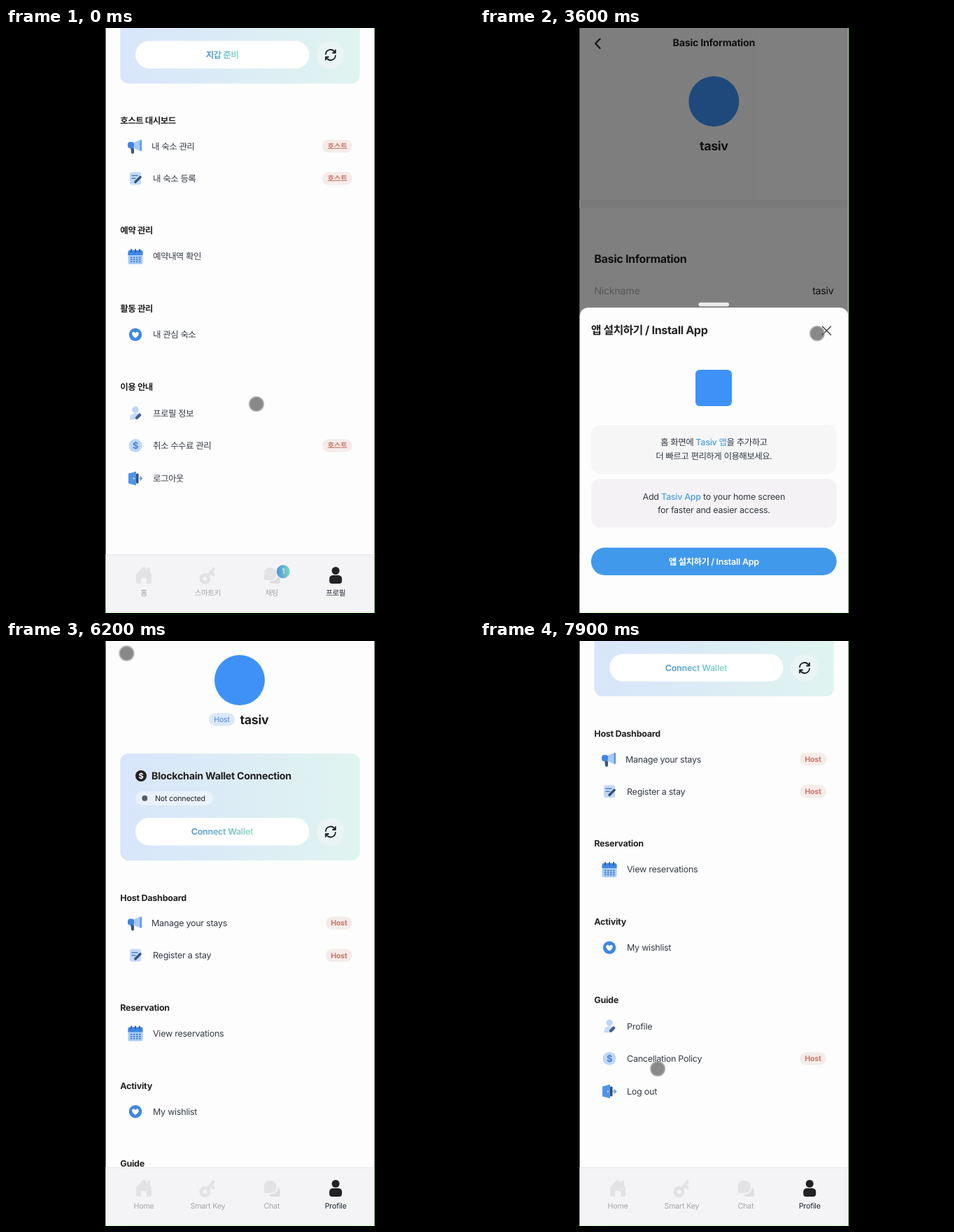
Animation, 669 px wide and 837 px high, one loop 8000 ms. Source, as an HTML page:

```html
<!DOCTYPE html>
<html lang="ko">
<head>
<meta charset="utf-8">
<title>Profile language switch</title>
<style>
html, body { margin: 0; width: 100%; height: 100%; overflow: hidden; background: #000; }
svg { display: block; }
text {
  font-family: Inter, "Noto Sans CJK KR", "Noto Sans CJK", sans-serif;
  letter-spacing: -.02em; fill: #222; white-space: pre; text-rendering: geometricPrecision;
}
.k { letter-spacing: -.045em; }
.b { font-weight: 700; }
.sb { font-weight: 600; }
.mid { text-anchor: middle; }
.end { text-anchor: end; }
.row { fill: #343a44; }
.soft { fill: #b0b0b4; }
.nav { fill: #a6a6a9; }
.on { fill: #1c2633; }
.red { fill: #c67a6c; }
.blue { fill: #4b83d6; }
.sky { fill: #4a9fe6; font-weight: 500; }
.white { fill: #fff; }
.grad { fill: url(#ink); }

.anim { animation: 8s step-end infinite; }
.ko-profile { animation-name: ko-profile; }
.ko-info { animation-name: ko-info; }
.lang { animation-name: lang; }
.en-info { animation-name: en-info; }
.en-profile { animation-name: en-profile; }
.badge { animation-name: badge; }
.touch { animation-name: touch; }
.arrow { animation-name: arrow; }
.scroll { animation: scroll 8s infinite ease-in-out; }
.dim { animation: dim 8s infinite linear; }
.sheet { animation: sheet 8s infinite ease-out; }
.cursor { animation: cursor 8s infinite ease-in-out; }

@keyframes ko-profile { 0% { visibility: visible } 7.5%, 100% { visibility: hidden } }
@keyframes ko-info { 0% { visibility: hidden } 7.5% { visibility: visible } 20%, 100% { visibility: hidden } }
@keyframes lang {
  0% { visibility: hidden } 20% { visibility: visible } 29.5% { visibility: hidden }
  61.25% { visibility: visible } 68.75%, 100% { visibility: hidden }
}
@keyframes en-info {
  0% { visibility: hidden } 29.5% { visibility: visible } 61.25% { visibility: hidden }
  68.75% { visibility: visible } 76.25%, 100% { visibility: hidden }
}
@keyframes en-profile { 0% { visibility: hidden } 76.25%, 100% { visibility: visible } }
@keyframes badge { 0% { opacity: 1 } 61.25%, 100% { opacity: 0 } }
@keyframes touch { 0% { opacity: 1 } 29.5% { opacity: 0 } 39%, 100% { opacity: 1 } }
@keyframes arrow { 0% { opacity: 0 } 29.5% { opacity: 1 } 39%, 100% { opacity: 0 } }
@keyframes scroll {
  0%, 86.5% { transform: translateY(0) }
  94%, 100% { transform: translateY(-234.5px) }
}
@keyframes dim { 0%, 37.5% { opacity: 0 } 41%, 47% { opacity: .5 } 50.5%, 100% { opacity: 0 } }
@keyframes sheet {
  0%, 37.5% { transform: translateY(450px) }
  41.5%, 47% { transform: none }
  51%, 100% { transform: translateY(450px) }
}
@keyframes cursor {
  0%, 1.25% { transform: translate(358px, 538px) }
  5%, 8% { transform: translate(246px, 552px) }
  16.25%, 19.5% { transform: translate(497px, 497px) }
  25%, 28% { transform: translate(365px, 404px) }
  29.5%, 39% { transform: translate(365px, 400px) }
  45% { transform: translate(482px, 437px) }
  46.5%, 49% { transform: translate(494px, 433px) }
  59%, 62.5% { transform: translate(169px, 23px) }
  66.25%, 77% { transform: translate(171px, 14px) }
  83.75%, 85% { transform: translate(297px, 340px) }
  98%, 100% { transform: translate(254px, 612px) }
}
</style>
</head>
<body>
<svg id="stage" width="669" height="837">
  <defs>
    <linearGradient id="ink"><stop stop-color="#4a90dc"/><stop offset="1" stop-color="#90dfc0"/></linearGradient>
    <linearGradient id="card"><stop stop-color="#d8e5fb"/><stop offset="1" stop-color="#e0f4ef"/></linearGradient>
    <linearGradient id="dot"><stop stop-color="#4b92df"/><stop offset="1" stop-color="#7fd8bc"/></linearGradient>
  </defs>
</svg>
<script>
const XS = 10.7, S = 12.5, M = 14.28, L = 16.07, XL = 17.86, XXL = 21.4;
const LOGO = '#3e92f7';
const NICK = 'tasiv', APP = 'Tasiv', MAIL = 'dorim2937@email.test';

const text = (x, y, size, s, cls = '') =>
  `<text x="${x}" y="${y}" font-size="${size}" class="${cls}">${s.replace(/[가-힣]+/g, '<tspan class="k">$&</tspan>')}</text>`;
const rect = (x, y, w, h, fill, r = 0) =>
  `<rect x="${x}" y="${y}" width="${w}" height="${h}" rx="${r}" fill="${fill}"/>`;
const circle = (x, y, r, fill) => `<circle cx="${x}" cy="${y}" r="${r}" fill="${fill}"/>`;
const path = (d, fill) => `<path d="${d}" fill="${fill}"/>`;
const line = (d, color, w) =>
  `<path d="${d}" fill="none" stroke="${color}" stroke-width="${w}" stroke-linecap="round" stroke-linejoin="round"/>`;
const at = (x, y, body) => `<g transform="translate(${x} ${y})">${body}</g>`;
const group = (cls, body) => `<g class="${cls}">${body}</g>`;

const paper = rect(142.5, 0, 384, 837, '#fdfdfd');
const person = (head, body) => circle(0, -6.5, 5.5, head) + path('M-9 8V5Q-9 0-3 0H3Q9 0 9 5V8Q9 12 5 12H-5Q-9 12-9 8Z', body);

const icons = {
  horn: path('M-7 2H-2V9Q-2 11-4 11Q-6 11-6 9Z', '#3f5878') + path('M-3-5L7-9V7L-3 3Z', '#a9c9f5') +
    rect(-11, -6, 9, 9, '#3f86e3', 3.5) + rect(6.5, -9, 2.5, 16, '#5b9aea', 1),
  note: rect(-8, -9, 16, 18, '#c3d9f8', 3) + line('M-5-4H3M-5 0H0', '#4a80cc', 1.6) +
    line('M0 5L7-2', '#36517c', 3.6),
  calendar: rect(-10.5, -8, 21, 19, '#a9cdf8', 2.5) + path('M-10.5-2V-6Q-10.5-9-8-9H8Q10.5-9 10.5-6V-2Z', '#3f86e3') +
    line('M-6-10V-7M0-10V-7M6-10V-7', '#2d62ac', 2) +
    `<path d="M-7 1.5H8M-7 4.5H8M-7 7.5H8" stroke="#3f78c8" stroke-width="1.6" stroke-dasharray="2.4 1.6"/>`,
  heart: circle(0, 0, 9.2, '#3f86e3') + path('M0 5C-7 0-5-4-2.5-4Q-.8-4 0-2Q.8-4 2.5-4C5-4 7 0 0 5Z', '#fff'),
  person: circle(0, -5, 4.7, '#bcd5f8') + path('M-8 9Q-8 0 0 0Q5 0 7 4L2 9Z', '#c6dbf9') + line('M2 6.5L6 2.5', '#3f5f95', 4.4),
  coin: circle(0, 0, 9.5, '#bfd7f9') + text(0, 4.6, 13, '$', 'mid b blue'),
  door: path('M-10-7L1-10V10L-10 7Z', '#4f94e8') + rect(1, -7, 3.5, 14, '#36527c', 1) +
    circle(-2, 0, 1, '#fff') + line('M5 0H9M7-2.4L9.6 0L7 2.4', '#6b9de0', 1.5),
};

const navIcons = [
  path('M-11-1L-2-11Q0-13 2-11L5-8V-11H9V-4L11-1V9Q11 12 8 12H4V4H-4V12H-8Q-11 12-11 9Z', '#e3e2e5'),
  `<circle cx="-4" cy="5" r="5.5" fill="none" stroke="#e3e2e5" stroke-width="5"/>` + line('M0 1L8-9M4-4L8-1', '#e3e2e5', 4.5),
  path('M-11-2Q-11-11-2-11Q7-11 7-2Q7 7-2 7H-9Q-11 7-11 5Z', '#e3e2e5') +
    path('M9-2Q12 2 12 5V10Q12 12 10 12H4Q-2 12-4 9Q9 9 9-2Z', '#dedde0'),
  person('#222', '#222'),
];

function nav(labels, badge) {
  const items = labels.map((s, i) => {
    const x = 197 + i * 91.4;
    return at(x, 783, navIcons[i]) + text(x, 812, XS, s, 'mid ' + (i == 3 ? 'on' : 'nav'));
  }).join('');
  const mark = badge ? group('anim badge', circle(396.3, 777.8, 9.5, 'url(#dot)') + text(396.3, 781.4, XS, '1', 'mid white')) : '';
  return rect(142.5, 753, 384, 84, '#f4f3f6') + rect(142.5, 753, 384, 1, '#e8e7ea') + items + mark;
}

function row(y, icon, label, host, x = 210) {
  const w = host == 'Host' ? 38 : 43;
  const tag = host ? rect(495 - w, y - 9.3, w, 18.6, '#f5ece9', 9.3) + text(495 - w / 2, y + 3.9, XS, host, 'mid b red') : '';
  return at(185, y, icons[icon]) + text(x, y + 4.5, S, label, 'row') + tag;
}

function profile(w) {
  const head = (y, s) => text(163.3, y + 4.5, S, s, 'b');
  const refresh = line('M-7-1A7 7 0 0 1 6-4M7-7V-3H3M7 1A7 7 0 0 1-6 4M-7 7V3H-3', '#222', 1.8);
  return circle(334, 56, 36, LOGO) + rect(290, 103, 37, 18.5, '#dbe8fb', 9.2) +
    text(308.5, 116, XS, w.host, 'mid blue') + text(334.5, 118.6, XL, NICK, 'b') +
    rect(163.3, 161, 342.5, 153, 'url(#card)', 12) +
    circle(193, 193, 8, '#222') + text(193, 197, 11, '$', 'mid b white') + text(208, 198, M, w.wallet, 'b') +
    `<g opacity=".4">${rect(185, 215, w.pill, 20, '#fff', 10)}</g>` +
    circle(198.3, 225, 4, '#555b64') + text(213, 228.8, XS, w.status) +
    rect(185, 253, 248.5, 39.5, '#fff', 19.7) + text(309, 277.3, S, w.connect, 'mid sb grad') +
    circle(464, 273, 20, '#eaf4f4') + at(464, 273, refresh) +
    head(367, w.dash) + row(403.5, 'horn', w.manage, w.host, 208) + row(449.8, 'note', w.register, w.host) +
    head(524, w.booking) + row(561.4, 'calendar', w.view) +
    head(636, w.activity) + row(673.2, 'heart', w.wish) +
    head(747.6, w.guide) + row(785.7, 'person', w.profile) + row(832, 'coin', w.cancel, w.host) + row(879, 'door', w.logout);
}

const topBar = s => line('M171.5 15.5L165 22.2L171.5 29', '#222', 2.1) + text(334.3, 26.3, M, s, 'mid b');

function info(w) {
  const values = [NICK, MAIL, '호스트', '한국어'];
  const rows = w.fields.map((s, i) => {
    const y = 380.6 + i * 39.5;
    return text(163.3, y, M, s, 'soft') + text(i == 3 ? 462 : 505.5, y, M, values[i], 'end');
  }).join('');
  return paper + topBar(w.title) + circle(334.3, 105, 36, LOGO) + text(334.3, 174.6, XL, NICK, 'mid b') +
    rect(142.5, 246, 384, 11, '#f3f2f4') + text(163.3, 336.3, L, w.title, 'b') + rows +
    rect(472, 484.3, 33.7, 21, '#ebf2f9', 10.5) +
    `<text x="488.8" y="498.8" font-size="${XS}" class="mid" style="fill:#45a0d0">${w.edit}</text>`;
}

function langCard(y, name, sub, glyph, size) {
  const bubbles = path('M8 0H50Q58 0 58 8V45Q58 53 50 53H21L7 60.5Q0 63 0 55V8Q0 0 8 0Z', '#222') +
    path('M63 12Q73 13 73 21V67Q73 74 66 72L51 64H18L26 58H58Q63 58 63 53Z', '#222');
  return rect(163.3, y, 342.5, 144.5, '#f4f3f6', 13) + text(181.2, y + 55, XL, name, 'b') +
    `<g opacity=".72">${text(181.2, y + 78.8, S, sub)}</g>` +
    at(415, y + 36, bubbles + text(29.5, 28 + size * .36, size, glyph, 'mid b white'));
}

const language = paper + topBar('언어 선택') +
  text(163.3, 80, XXL, '사용 언어를 선택해주세요.', 'b') + text(163.3, 116, XXL, 'Please select a language.', 'b') +
  langCard(197, '한국어', '한국어로 서비스 이용하기', '가나', 23) +
  langCard(363, 'English', 'Use the service in English', 'Aa', 27);

const install = '앱 설치하기 / Install App';
const sky = s => `<tspan class="sky">${s}</tspan>`;
const sheet = rect(312.5, 392.8, 43.5, 5.4, '#ebebeb', 2.7) +
  path('M142.5 837V414Q142.5 400 156.5 400H512.5Q526.5 400 526.5 414V837Z', '#fdfdfd') +
  text(158.8, 438.3, L, install, 'b') + line('M489.5 427L501.5 439M501.5 427L489.5 439', '#444', 1.5) +
  rect(308, 489, 52, 52, LOGO, 6) +
  rect(158.8, 568, 351, 70, '#f6f6f7', 14) + rect(158.8, 645, 351, 70, '#f4f2f5', 14) +
  text(334.3, 597, S, `홈 화면에 ${sky(APP + ' 앱')}을 추가하고`, 'mid row') +
  text(334.3, 617.2, S, '더 빠르고 편리하게 이용해보세요.', 'mid row') +
  text(334.3, 674.6, S, `Add ${sky(APP + ' App')} to your home screen`, 'mid row') +
  text(334.3, 694.2, S, 'for faster and easier access.', 'mid row') +
  rect(158.8, 743.5, 351, 39.5, '#4199ec', 19.7) + text(334.3, 768, S, install, 'mid sb white');

const ko = {
  nav: ['홈', '스마트키', '채팅', '프로필'], host: '호스트', wallet: '블록체인 지갑 연결', status: '연결 안됨', pill: 80,
  connect: '지갑 준비', dash: '호스트 대시보드', manage: '내 숙소 관리', register: '내 숙소 등록', booking: '예약 관리',
  view: '예약내역 확인', activity: '활동 관리', wish: '내 관심 숙소', guide: '이용 안내', profile: '프로필 정보',
  cancel: '취소 수수료 관리', logout: '로그아웃', title: '기본정보', fields: ['닉네임', '이메일 주소', '권한', '사용 언어'], edit: '수정',
};
const en = {
  nav: ['Home', 'Smart Key', 'Chat', 'Profile'], host: 'Host', wallet: 'Blockchain Wallet Connection', status: 'Not connected', pill: 111,
  connect: 'Connect Wallet', dash: 'Host Dashboard', manage: 'Manage your stays', register: 'Register a stay', booking: 'Reservation',
  view: 'View reservations', activity: 'Activity', wish: 'My wishlist', guide: 'Guide', profile: 'Profile',
  cancel: 'Cancellation Policy', logout: 'Log out', title: 'Basic Information', fields: ['Nickname', 'Email', 'Role', 'Language'], edit: 'Edit',
};

const pointer = group('anim touch', '<circle r="10.2" fill="#3c3c3c" fill-opacity=".6" stroke="#a8a8a8" stroke-opacity=".7" stroke-width="2"/>') +
  group('anim arrow', '<path d="M0 0V17L4 13.3L6.6 19L9 18L6.5 12.4H12Z" fill="#fff" stroke="#222"/>');

document.getElementById('stage').insertAdjacentHTML('beforeend',
  rect(0, 0, 669, 837, '#000') +
  group('anim ko-profile', paper + at(0, -234.5, profile(ko)) + nav(ko.nav, true)) +
  group('anim ko-info', info(ko) + nav(ko.nav, true)) +
  group('anim lang', language) +
  group('anim en-info', info(en) + nav(en.nav, true)) +
  group('anim en-profile', paper + group('scroll', profile(en)) + nav(en.nav)) +
  group('dim', rect(142.5, 0, 384, 837, '#000')) + group('sheet', sheet) +
  rect(526, 0, 1, 837, '#a5e8a0') + rect(142.5, 836, 384, 1, '#c9fbc0') +
  group('cursor', pointer));
</script>
</body>
</html>
```
